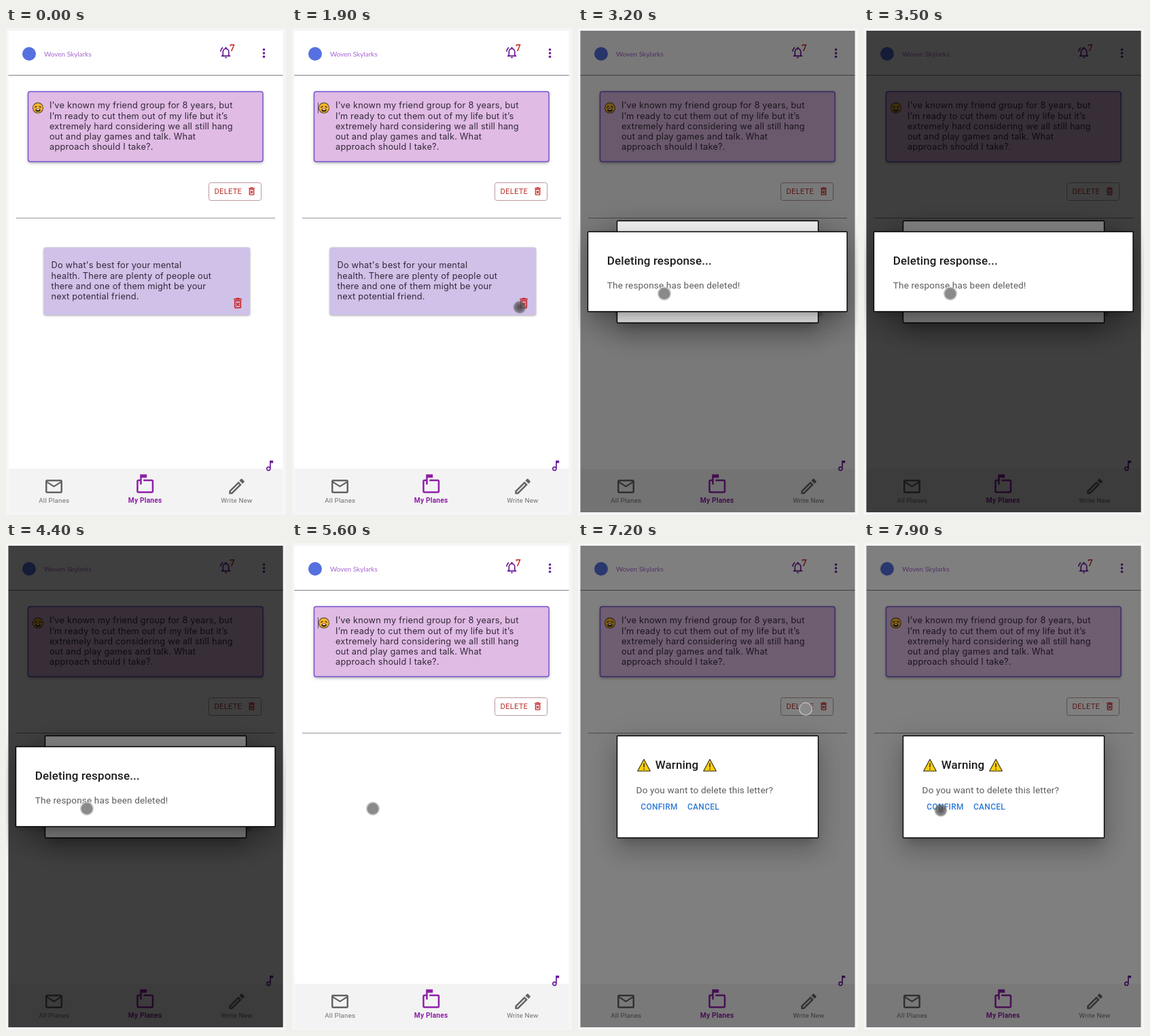
An HTML page with a canvas that plays this animation: 412x716 px, repeating every 8000 ms.

```html
<!DOCTYPE html>
<html lang="en">
<head>
<meta charset="utf-8">
<title>My Planes</title>
<style>
html, body { margin: 0; width: 100%; height: 100%; overflow: hidden; background: #f5f5f5; }
canvas { display: block; width: 412px; height: 716px; }
</style>
</head>
<body>
<canvas id="stage"></canvas>
<script>
const W = 412, H = 716, LOOP = 8000, STEP = 100;
const canvas = document.getElementById('stage');
const dpr = window.devicePixelRatio || 1;
canvas.width = W * dpr;
canvas.height = H * dpr;
const c = canvas.getContext('2d');

const PURPLE = '#6a1b9a', VIOLET = '#8e1fa8', RED = '#c62828', GREY = '#646464';
const ROBOTO = 'Roboto, sans-serif', INTER = 'Inter, sans-serif';

const icons = {
  bell: 'M12 22c1.1 0 2-.9 2-2h-4c0 1.1.9 2 2 2zm6-6v-5c0-3.07-1.63-5.64-4.5-6.32V4c0-.83-.67-1.5-1.5-1.5s-1.5.67-1.5 1.5v.68C7.64 5.36 6 7.92 6 11v5l-2 2v1h16v-1zm-2 1H8v-6c0-2.48 1.51-4.5 4-4.5s4 2.02 4 4.5zM7.58 4.08L6.15 2.65C3.75 4.48 2.17 7.3 2.03 10.5h2c.15-2.65 1.51-4.97 3.55-6.42z',
  trash: 'M14.12 10.47L12 12.59l-2.13-2.12-1.41 1.41L10.59 14l-2.12 2.12 1.41 1.41L12 15.41l2.12 2.12 1.41-1.41L13.41 14l2.12-2.12zM15.5 4l-1-1h-5l-1 1H5v2h14V4zM6 19c0 1.1.9 2 2 2h8c1.1 0 2-.9 2-2V7H6zM8 9h8v10H8z',
  note: 'M12 3v10.55c-.59-.34-1.27-.55-2-.55-2.21 0-4 1.79-4 4s1.79 4 4 4 4-1.79 4-4V7h4V3zm-2 16c-1.1 0-2-.9-2-2s.9-2 2-2 2 .9 2 2-.9 2-2 2z',
  mail: 'M22 6c0-1.1-.9-2-2-2H4c-1.1 0-2 .9-2 2v12c0 1.1.9 2 2 2h16c1.1 0 2-.9 2-2zm-2 0l-8 5-8-5zm0 12H4V8l8 5 8-5z',
  mailbox: 'M20 6H10v2h10v12H4V8h2v4h2V4h6V0H6v6H4c-1.1 0-2 .9-2 2v12c0 1.1.9 2 2 2h16c1.1 0 2-.9 2-2V8c0-1.1-.9-2-2-2z',
  pen: 'M14.06 9.02l.92.92L5.92 19H5v-.92zM3 17.25V21h3.75L17.81 9.94l-3.75-3.75zM20.71 7.04c.39-.39.39-1.02 0-1.41l-2.34-2.34c-.39-.39-1.02-.39-1.41 0l-1.83 1.83 3.75 3.75z'
};
for (const name in icons) icons[name] = new Path2D(icons[name]);

// Draws a 24-unit icon centred on x, y.
function icon(name, x, y, scale, color) {
  c.save();
  c.translate(x, y);
  c.scale(scale, scale);
  c.translate(-12, -12);
  c.fillStyle = color;
  c.fill(icons[name], 'evenodd');
  c.restore();
}

function text(str, x, y, font, color, spacing = 0) {
  c.font = font;
  c.letterSpacing = spacing + 'px';
  c.fillStyle = color;
  c.fillText(str, x, y);
}

function lines(list, x, y) {
  list.forEach((s, i) => text(s, x, y + i * 15.25, '400 12.8px ' + INTER, '#33293a', 0.2));
}

function rect(x, y, w, h, color) {
  c.fillStyle = color;
  c.fillRect(x, y, w, h);
}

function disc(x, y, r, color) {
  c.fillStyle = color;
  c.beginPath();
  c.arc(x, y, r, 0, Math.PI * 2);
  c.fill();
}

function box(x, y, w, h, r, fill, stroke, width, shadow) {
  c.save();
  c.beginPath();
  c.roundRect(x, y, w, h, r);
  if (shadow) {
    c.shadowColor = `rgba(0,0,0,${shadow.alpha})`;
    c.shadowBlur = shadow.blur * dpr;
    c.shadowOffsetY = shadow.y * dpr;
  }
  if (fill) {
    c.fillStyle = fill;
    c.fill();
  }
  c.shadowColor = 'transparent';
  if (stroke) {
    c.strokeStyle = stroke;
    c.lineWidth = width;
    c.stroke();
  }
  c.restore();
}

const smooth = k => {
  k = Math.min(1, Math.max(0, k));
  return k * k * (3 - 2 * k);
};

function face(x, y) {
  disc(x, y, 8, '#4a3a20');
  disc(x, y, 7.1, '#f6b52e');
  c.strokeStyle = '#3a2608';
  c.lineWidth = 1.2;
  c.beginPath();
  for (const s of [-1, 1]) {
    c.moveTo(x + s * 4.8, y - 0.8);
    c.lineTo(x + s * 1.6, y - 2.4);
  }
  c.stroke();
  c.fillStyle = '#3a2608';
  c.beginPath();
  c.ellipse(x, y + 3, 3.6, 2.6, 0, 0, Math.PI * 2);
  c.fill();
  rect(x - 2, y + 1.2, 4, 1.8, '#fff');
}

function page(t) {
  rect(0, 0, W, H, '#f5f5f5');
  rect(3.5, 4, 404, 708, '#fff');

  disc(34, 38, 10, '#5570e0');
  text('Woven Skylarks', 56, 41.6, '400 10px Lato, sans-serif', '#a766d2');
  icon('bell', 323.5, 36, 0.85, PURPLE);
  text('7', 329, 34, '700 14px "Noto Serif", serif', RED);
  for (const dy of [-5.3, 0, 5.3]) disc(379.5, 37 + dy, 1.8, PURPLE);
  rect(3.5, 69, 404, 1, '#808080');

  box(32.5, 93.5, 345.5, 103, 3, '#e0bbe4', '#7253cc', 1.4,
    { alpha: 0.35, blur: 4, y: 2 });
  face(47, 117.5);
  lines(['I’ve known my friend group for 8 years, but',
    'I’m ready to cut them out of my life but it’s',
    'extremely hard considering we all still hang',
    'out and play games and talk. What',
    'approach should I take?.'], 64, 118.3);

  box(298.5, 227.5, 77, 26, 3, null, '#bb9a9a', 1);
  text('DELETE', 306.5, 244, '400 11.05px ' + ROBOTO, '#b8302c', 0.32);
  icon('trash', 361.5, 240, 0.64, RED);
  rect(15, 279, 381, 1, '#969696');

  if (t < 5600) {
    box(55.5, 322.5, 303.5, 99.5, 3, '#d0c1e8', null, 0,
      { alpha: 0.35, blur: 3, y: 1 });
    lines(["Do what's best for your mental",
      'health. There are plenty of people out',
      'there and one of them might be your',
      'next potential friend.'], 66.5, 353.3);
    icon('trash', 341, 404.5, 0.85, RED);
  }

  rect(3.5, 648, 404, 64, '#f3f3f3');
  icon('note', 388, 643.7, 0.85, PURPLE);
  icon('mail', 70.5, 674, 1.25, GREY);
  icon('mailbox', 204.7, 671.3, 1.25, VIOLET);
  icon('pen', 339.5, 674, 1.25, GREY);
  const label = '400 9.8px ' + ROBOTO;
  text('All Planes', 48.3, 698.4, label, '#707070', 0.18);
  text('My Planes', 179.8, 697.6, '700 10.2px ' + ROBOTO, VIOLET, 0.2);
  text('Write New', 316.3, 698.4, label, '#707070', 0.18);
}

// Backdrop that darkens shortly after a dialog opens.
function backdrop(age) {
  rect(3.5, 4, 404, 708, `rgba(0,0,0,${0.5 * smooth((age + 25) / 130)})`);
}

// Layered elevation shadow: each layer grows or shrinks before it blurs.
function panel(x, y, w, h) {
  const layers = [
    { y: 9, blur: 13, grow: -6, alpha: 0.2 },
    { y: 20, blur: 32, grow: 2.5, alpha: 0.14 },
    { y: 8, blur: 39, grow: 7, alpha: 0.12 }
  ];
  const far = 2000;
  for (const s of layers) {
    // The caster stays off stage so only its shadow shows.
    c.save();
    c.shadowColor = `rgba(0,0,0,${s.alpha})`;
    c.shadowBlur = s.blur * dpr;
    c.shadowOffsetX = far * dpr;
    c.shadowOffsetY = s.y * dpr;
    rect(x - s.grow - far, y - s.grow, w + 2 * s.grow, h + 2 * s.grow, '#000');
    c.restore();
  }
  box(x, y, w, h, 1, '#fff', '#000', 1.4);
}

function warnSign(x, y) {
  c.beginPath();
  c.moveTo(x, y - 8.5);
  c.lineTo(x + 9.3, y + 8.8);
  c.lineTo(x - 9.3, y + 8.8);
  c.closePath();
  c.lineJoin = 'round';
  c.fillStyle = '#fdce0b';
  c.fill();
  c.strokeStyle = '#2e2a18';
  c.lineWidth = 1.1;
  c.stroke();
  rect(x - 0.7, y - 2.8, 1.4, 6.2, '#1d1a10');
  disc(x, y + 5.8, 0.9, '#1d1a10');
}

const TITLE = '500 17px ' + ROBOTO, BODY = '400 13.6px ' + ROBOTO;

function confirmBox(what) {
  panel(57.5, 283.5, 296, 150);
  warnSign(97, 326.5);
  warnSign(194, 326.5);
  text('Warning', 113.7, 332, TITLE, '#1c1c1c', 0.12);
  text(`Do you want to delete this ${what}?`, 85.6, 367.7, BODY, '#5c5c5c', 0.128);
  const font = '500 11.9px ' + ROBOTO;
  text('CONFIRM', 92.3, 392.3, font, '#2f7bd8', 0.34);
  text('CANCEL', 161, 392.3, font, '#2f7bd8', 0.34);
}

function doneBox() {
  panel(14.5, 299.5, 381.5, 117.5);
  text('Deleting response...', 42.8, 347.6, TITLE, '#1c1c1c', 0.12);
  text('The response has been deleted!', 42.8, 383, BODY, '#5c5c5c', 0.128);
}

// Pointer stops: time, x, y.
const path = [[1300, 424, 452], [1800, 335, 410.5], [2200, 335, 410.5], [2900, 127, 390.5],
  [3700, 127, 390.5], [4200, 119, 390.5], [6000, 119, 390.5], [6800, 335, 244],
  [7200, 335, 244], [7800, 113, 393], [LOOP, 113, 393]];
const presses = [1900, 2900, 3000, 6800, 6900, 7000, 7900];

function pointer(t) {
  if (t < path[0][0]) return;
  const i = path.findIndex(p => p[0] > t);
  const [t0, x0, y0] = path[i - 1], [t1, x1, y1] = path[i];
  const k = smooth((t - t0) / (t1 - t0));
  const x = x0 + (x1 - x0) * k, y = y0 + (y1 - y0) * k;
  if (presses.includes(t)) {
    const g = c.createRadialGradient(x, y, 2, x, y, 10);
    g.addColorStop(0, 'rgba(70,70,70,.88)');
    g.addColorStop(0.7, 'rgba(90,90,90,.68)');
    g.addColorStop(1, 'rgba(120,120,120,.1)');
    disc(x, y, 10, g);
  } else {
    disc(x, y, 10, 'rgba(190,190,190,.9)');
    disc(x, y, 8.3, '#8a8a8a');
  }
}

function draw(t) {
  c.setTransform(dpr, 0, 0, dpr, 0, 0);
  const first = t >= 2000 && t < 5600, second = t >= 7000;
  page(t);
  if (!first && !second && t % 1000 >= 500) rect(38, 109.5, 1, 16, '#5a4a62');
  if (first) {
    backdrop(t - 2000);
    confirmBox('response');
    if (t >= 3200) {
      backdrop(t - 3200);
      doneBox();
    }
  }
  if (second) {
    backdrop(t - 7000);
    confirmBox('letter');
  }
  pointer(t);
}

// The screen updates ten times a second.
function tick() {
  draw(Math.floor((performance.now() % LOOP) / STEP) * STEP);
  requestAnimationFrame(tick);
}
tick();
</script>
</body>
</html>
```
